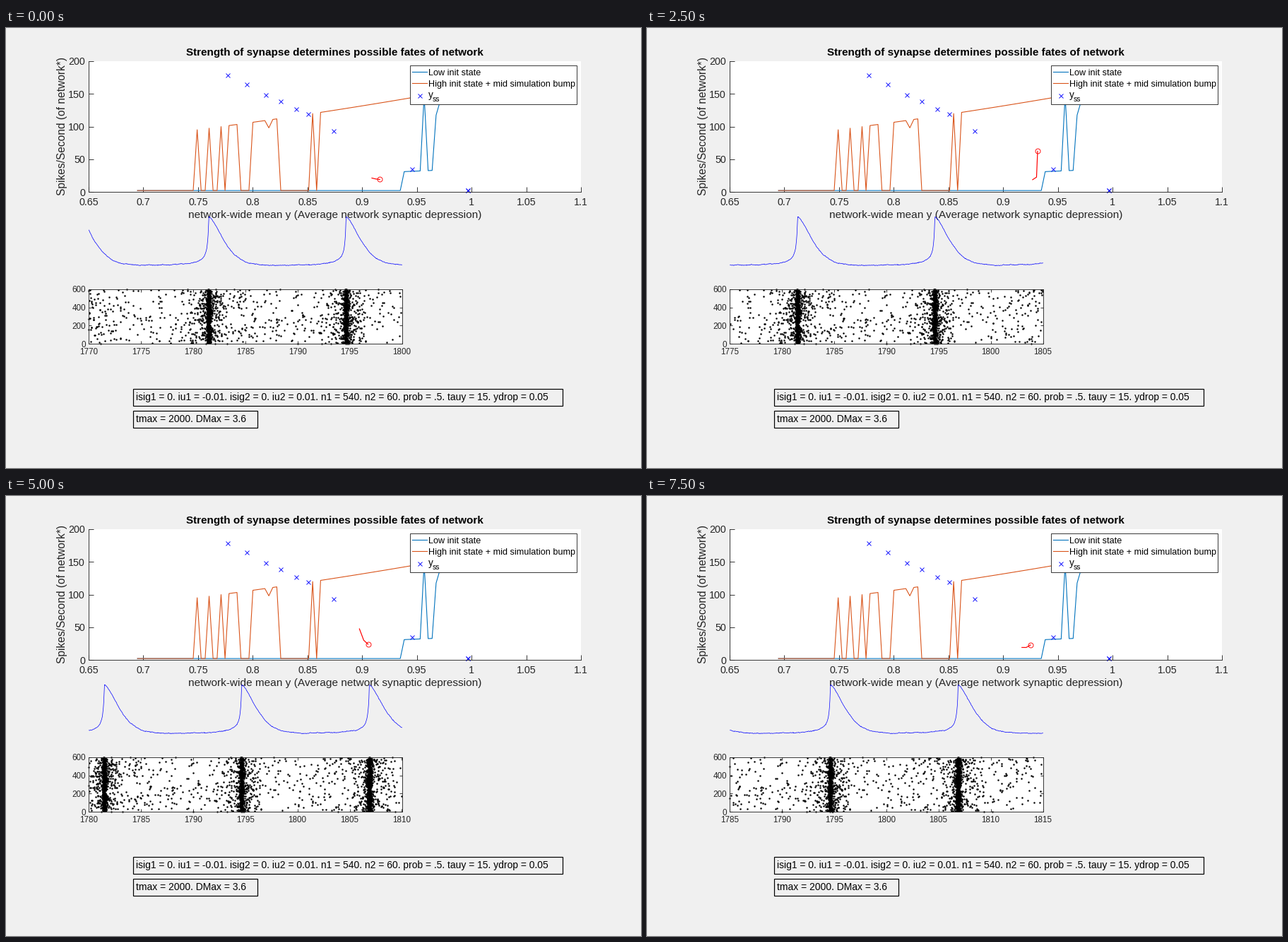
A matplotlib script that plays this animation: 899x623 px, repeating every 8 s.

```python
import numpy as np
import matplotlib.pyplot as plt
from matplotlib.animation import FuncAnimation
from matplotlib.patches import Rectangle

W, H, DPI = 899, 623, 100
FRAMES, STEP_MS = 16, 500
T0, SPAN = 1770, 30
INK = "#262626"
BLUE, ORANGE = (0, 0.447, 0.741), (0.85, 0.325, 0.098)
BURSTS = (1769.1, 1781.5, 1794.65, 1806.88)

plt.rcParams.update({
    "font.family": "Liberation Sans",
    "axes.edgecolor": INK,
    "xtick.color": INK,
    "ytick.color": INK,
})


def pt(px):
    return px * 72 / DPI


def add_axes(left, top, right, bottom, z):
    box = (left / W, 1 - bottom / H, (right - left) / W, (bottom - top) / H)
    return fig.add_axes(box, zorder=z)


def label(x, y, s, size, color="black", **kw):
    """Place text by pixel, with y at the middle of the capitals."""
    return page.text(x, y + 0.36 * size, s, fontsize=pt(size), color=color,
                     va="baseline", **kw)


def frame_box(x0, y0, x1, y1, lw, **kw):
    page.add_patch(Rectangle((x0, y0), x1 - x0, y1 - y0, lw=pt(lw), **kw))


fig = plt.figure(figsize=(W / DPI, H / DPI), dpi=DPI, facecolor="#f0f0f0")
phase = add_axes(117, 47, 814, 232, 1)
raster = add_axes(117, 370, 560.5, 447, 1)
page = add_axes(0, 0, W, H, 2)
trace = add_axes(117, 265, 560.5, 340, 3)
page.set(xlim=(0, W), ylim=(H, 0))
trace.set_ylim(340, 265)
page.axis("off")
trace.axis("off")

# Axes
phase.spines[["top", "right"]].set_visible(False)
phase.set_xlim(0.65, 1.1)
xt = np.arange(0.65, 1.11, 0.05)
phase.set_xticks(xt, [f"{v:.2f}".rstrip("0").rstrip(".") for v in xt])
raster.set_ylim(0, 600)
raster.set_yticks(range(0, 601, 200))
raster.tick_params(top=True, right=True)
for ax, tick, size, pads in ((phase, 7, 14.2, (7.7, 5)),
                             (raster, 4.4, 11.6, (5.5, 4))):
    ax.tick_params(direction="in", length=pt(tick), width=pt(0.9),
                   labelsize=pt(size))
    ax.tick_params(axis="x", pad=pt(pads[0]))
    ax.tick_params(axis="y", pad=pt(pads[1]))
    for spine in ax.spines.values():
        spine.set_linewidth(pt(0.9))

# Both branches sit near zero or jump to a common active rate
step = np.arange(-14, 86)
depression = 0.74555 + 0.00364 * step
active = 94.3 + 0.78 * step + 0.00235 * step ** 2


def between(first, last):
    return (step >= first) & (step <= last)


low = np.where(between(53, 60), 31 + 0.25 * (step - 53), 2)
low = np.where(step == 58, active, low)
low = np.where(step > 60, active * (1 - 0.22 * 0.4 ** (step - 61.0)), low)
high = np.full(step.size, 2.0)
for run in ((1, 1), (4, 4), (7, 7), (9, 11), (15, 21), (30, 30), (32, 85)):
    high = np.where(between(*run), active, high)
high[step == 19] -= 12
for rate, last, color in ((low, 63, BLUE), (high, 85, ORANGE)):
    shown = step <= last
    phase.plot(depression[shown], rate[shown], color=color, lw=pt(1.1),
               solid_joinstyle="round")

steady = np.array([(0.777, 178), (0.7947, 164), (0.8118, 148), (0.8255, 138.4),
                   (0.8395, 126.5), (0.851, 119), (0.8738, 92.5),
                   (0.9454, 35), (0.997, 2.5)])
cross = dict(ls="", marker="x", color="blue", ms=pt(6.2), mew=pt(0.9))
phase.plot(*steady.T, clip_on=False, **cross)
phase.plot(*steady[-1:].T, clip_on=False, **cross)

# Network state once per second: y recovers slowly and drops at a burst
sec = np.arange(-2, FRAMES)
mean_y = np.interp(sec, (-2, 4, 5, 6, 7, 8, 15),
                   (0.9089, 0.9305, 0.9315, 0.9205, 0.8962, 0.8975, 0.925))
firing = np.full(sec.size, 18.0)
for peak in (-7, 6, 17):
    gap = np.abs(sec - peak).astype(float)
    firing += np.where(sec < peak, 442 * 0.1 ** gap,
                       381 * 0.17 ** gap + 61 * 0.55 ** gap)
tail, = phase.plot([], [], color="red", lw=pt(1.2))
head, = phase.plot([], [], "o", mfc="none", mec="red", ms=pt(7), mew=pt(0.9))

# Labels, legend and notes
title = label(465.5, 34, "Strength of synapse determines possible fates of network",
              15.3, weight="bold", ha="center")
label(466, 263.3, "network-wide mean y (Average network synaptic depression)",
      15.35, INK, ha="center")
page.text(79.5, 139, "Spikes/Second (of network*)", fontsize=pt(15.5),
          color=INK, rotation=90, ha="center", va="center")

frame_box(572, 53, 808, 107.5, 0.9, fc="white", ec=INK)
for y, color, name in ((62, BLUE, "Low init state"),
                       (78, ORANGE, "High init state + mid simulation bump")):
    page.plot([575, 596], [y, y], color=color, lw=pt(1.1))
    label(597.5, y, name, 12.65)
page.plot([585.5], [96], **cross)
label(597.5, 94.5, "y", 13.5)
label(604, 100.5, "ss", 10.2)

for y0, x1, note in (
        (510.5, 788, "isig1 = 0. iu1 = -0.01. isig2 = 0. iu2 = 0.01. n1 = 540. "
                     "n2 = 60. prob = .5. tauy = 15. ydrop = 0.05"),
        (541.5, 356, "tmax = 2000. DMax = 3.6")):
    frame_box(179.5, y0, x1, y0 + 24.5, 1.2, fc="none", ec="black")
    label(183.5, y0 + 11.5, note, 13.95)

# Mean drive: slow ramp, jump, then decay around each burst
rng = np.random.default_rng(8)
time = np.arange(T0, T0 + FRAMES + SPAN, 0.04)


def pulse(dt):
    ramp = 0.11 / (0.11 + np.maximum(-dt, 0)) - 0.015
    decay = np.exp(-(np.maximum(dt, 0) / 1.88) ** 1.5)
    return np.where(dt < 0, ramp, decay)


wobble = np.convolve(rng.normal(0, 1, time.size), np.ones(9) / 9, "same")
drive = 336 - 69 * np.max([pulse(time - b) for b in BURSTS], axis=0)
drive += 0.9 * wobble + rng.normal(0, 0.22, time.size)
curve, = trace.plot([], [], color="blue", lw=pt(0.7))

# Spikes: steady background plus a dense core and a fading skirt per burst
spikes = [rng.uniform(T0 - 1, T0 + 47, 15 * 48)]
for b in BURSTS:
    spikes += [rng.normal(b, 0.12, 430), rng.laplace(b, 0.75, 300)]
spikes = np.concatenate(spikes)
cells = rng.integers(1, 601, spikes.size)
dots, = raster.plot([], [], "o", color="black", ms=pt(2.5), mew=0,
                    clip_on=False)


def update(k):
    start, end = T0 + k, T0 + k + SPAN
    lo, hi = start // 5 * 5, -(-end // 5) * 5
    ticks = range(lo, hi + 1, 5)
    raster.set_xticks(ticks, [str(t) for t in ticks])
    raster.set_xlim(lo, hi)
    trace.set_xlim(lo, hi)

    seen = (time >= start) & (time <= end)
    curve.set_data(time[seen], drive[seen])
    fired = (spikes >= start) & (spikes <= end)
    dots.set_data(spikes[fired], cells[fired])

    recent = slice(k, k + 3)
    tail.set_data(mean_y[recent], firing[recent])
    head.set_data([mean_y[k + 2]], [firing[k + 2]])
    tall = firing[recent].max() > 200
    phase.set_yticks(range(0, 501, 100) if tall else range(0, 201, 50))
    phase.set_ylim(0, 500 if tall else 200)
    title.set_y((35 if tall else 34) + 5.5)
    return curve, dots, tail, head, title


anim = FuncAnimation(fig, update, frames=FRAMES, interval=STEP_MS,
                     repeat=True, repeat_delay=0, blit=False)
plt.show()
```
